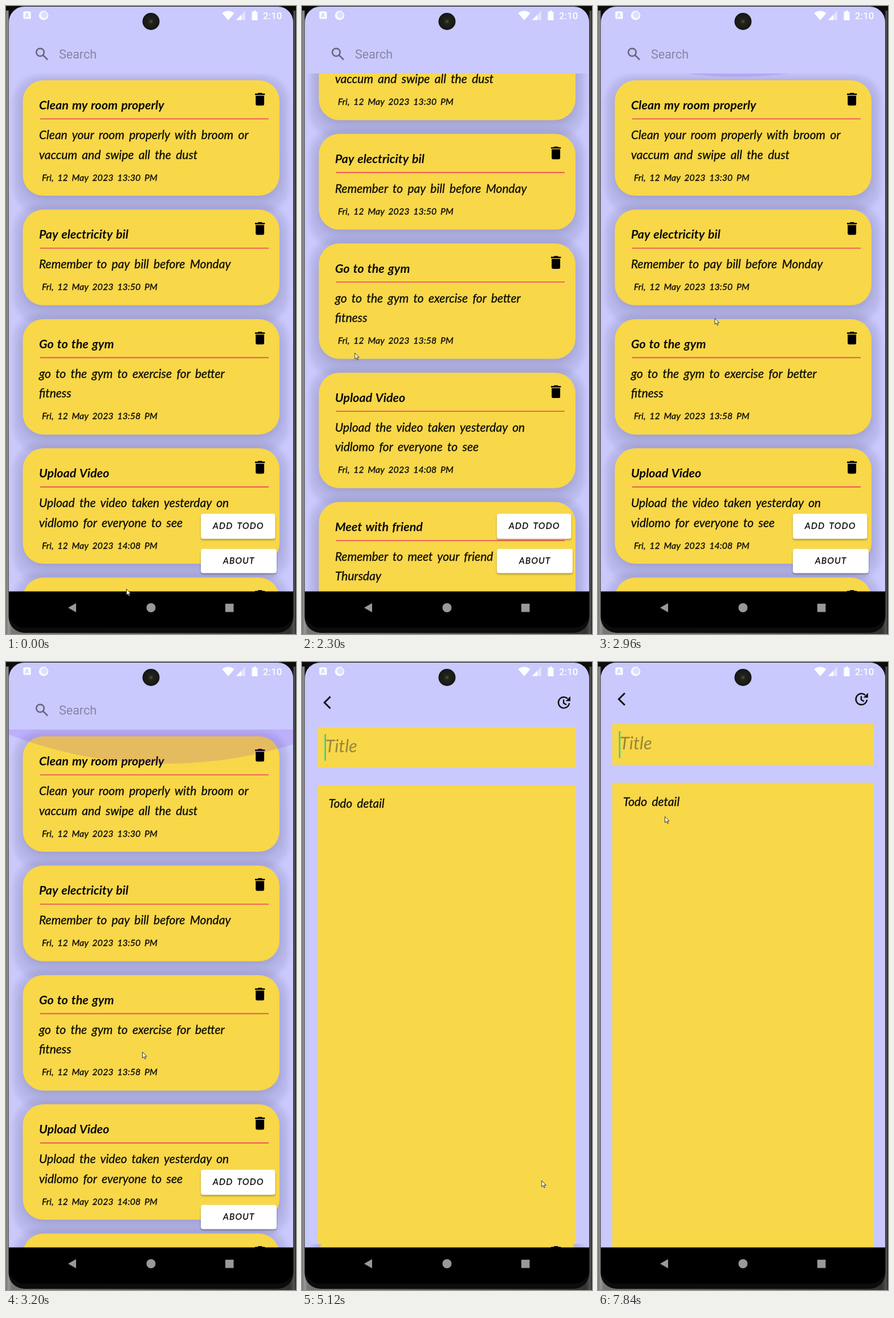
An HTML page that plays this animation: 509 px wide and 1099 px high, repeating every 8 s.

```html
<!DOCTYPE html>
<html lang="en">
<head>
<meta charset="utf-8">
<title>Todo app</title>
<style>
  html, body { margin: 0; height: 100%; overflow: hidden; background: #000; }
  svg { display: block; width: 100%; height: 100%; }
  text { font-family: Lato, "Open Sans", sans-serif; font-style: italic; fill: #0b0a05; }
  .ui { font-family: Roboto, sans-serif; font-style: normal; }
  .heading { font-size: 21.5px; font-weight: 700; word-spacing: 1.5px; }
  .body { font-size: 21px; word-spacing: 3.5px; }
  .date { font-size: 16px; word-spacing: 3px; }
  .label { font-size: 15.5px; letter-spacing: 1.2px; word-spacing: 3px; }
  .body, .date, .label { stroke: #0b0a05; stroke-width: .3px; }
  .paper { fill: #f8d749; }
  .halo { fill: #00001e; opacity: .065; filter: blur(4px); }
  .card { filter: drop-shadow(0 8px 11px rgba(0, 0, 20, .16)); }
  .button { fill: #fff; filter: drop-shadow(0 2px 1.5px rgba(0, 0, 0, .32)); }
  .button.pressed { filter: drop-shadow(0 6px 4px rgba(0, 0, 0, .36)); }
  #editor { transform-origin: 254px 512px; }
</style>
</head>
<body>
<svg viewBox="0 0 509 1099" preserveAspectRatio="none">
  <defs>
    <linearGradient id="metal">
      <stop offset="0" stop-color="#777"/>
      <stop offset=".009" stop-color="#989898"/>
      <stop offset=".02" stop-color="#777"/>
      <stop offset=".98" stop-color="#333"/>
      <stop offset=".994" stop-color="#555"/>
      <stop offset="1" stop-color="#222"/>
    </linearGradient>
    <radialGradient id="lens">
      <stop offset="0" stop-color="#5a583f"/>
      <stop offset=".25" stop-color="#24241d"/>
      <stop offset="1" stop-color="#151513"/>
    </radialGradient>
    <clipPath id="screenClip"><rect x="5" y="1" width="499" height="1087" rx="27"/></clipPath>
    <clipPath id="listClip"><rect x="5" y="118" width="499" height="907"/></clipPath>
    <path id="trash" d="M6 19c0 1.1.9 2 2 2h8c1.1 0 2-.9 2-2V7H6zM19 4h-3.5l-1-1h-5l-1 1H5v2h14z"/>
  </defs>

  <rect width="509" height="1099" fill="url(#metal)"/>
  <rect x="4.5" y="-30" width="500" height="1127" rx="28" fill="#0c0c0c"/>
  <rect width="509" height="8" fill="#0c0c0c"/>

  <g clip-path="url(#screenClip)">
    <rect x="5" y="1" width="499" height="1024" fill="#c9c9fe"/>

    <g id="home">
      <g fill="none" stroke="#65657f" stroke-width="2.5">
        <circle cx="60" cy="81" r="6.8"/>
        <path d="M65 86l8 8"/>
      </g>
      <text class="ui" x="93" y="92" style="font-size:21.5px;fill:#8686a6">Search</text>
      <g clip-path="url(#listClip)">
        <g id="cards"></g>
        <circle id="glow" r="760" fill="#6200ee" opacity=".13"/>
      </g>
      <rect id="add" class="button" x="342" y="888.5" width="130.5" height="44" rx="4"/>
      <rect class="button" x="342" y="950" width="133" height="42.5" rx="4"/>
      <text class="label" x="363" y="915">ADD TODO</text>
      <text class="label" x="381" y="976">ABOUT</text>
    </g>

    <g id="editor">
      <rect x="5" y="1" width="499" height="1024" fill="#c9c9fe"/>
      <g fill="none" stroke="#111" stroke-width="2.5">
        <path d="M47 54.5L36.5 65L47 75.5" stroke-width="3"/>
        <path d="M469 58A9.7 9.7 0 1 0 472 66M462 59.5V66L467 69"/>
        <path d="M474 54V62.5H465.500z" fill="#111" stroke="none"/>
      </g>
      <rect class="paper" x="25" y="108.5" width="459" height="71.5"/>
      <rect class="paper" x="25" y="211.5" width="459" height="814"/>
      <text x="38" y="153" style="font-size:31px;fill:#96863a">Title</text>
      <rect id="caret" x="36.7" y="121" width="2.5" height="47" fill="#1fd3a4"/>
      <text class="body" x="44" y="252">Todo detail</text>
    </g>

    <g fill="#fff">
      <rect x="30.5" y="9.5" width="13" height="13" rx="1.5"/>
      <text class="ui" x="33.3" y="20" style="font-size:10.5px;font-weight:700;fill:#c9c9fe">A</text>
      <circle cx="66" cy="16.5" r="8.3" opacity=".85"/>
      <circle cx="67" cy="15.5" r="5.5" fill="#dedefc"/>
      <path d="M379.5 12.5Q390 4.5 400.5 12.5L390 25z"/>
      <path d="M420 8.5V24.5H404z" opacity=".45"/>
      <path d="M413 15.5V24.5H404z"/>
      <path d="M431.5 10h3V8h4v2h3v15h-10z"/>
      <text class="ui" x="451" y="23" style="font-size:17px;font-weight:500;fill:#fff">2:10</text>
    </g>

    <rect x="5" y="1024.5" width="499" height="64"/>
    <g fill="#999">
      <path d="M109 1053L123 1045V1061z"/>
      <circle cx="254.5" cy="1053" r="8"/>
      <rect x="385" y="1046" width="14.5" height="14.5"/>
    </g>
  </g>
  <circle cx="254.5" cy="27" r="15" fill="url(#lens)"/>
  <path id="pointer" d="M.5 .5V11L3 8.8L4.8 12.7L6.4 12L4.7 8.2H8z" fill="#fff" stroke="#222" stroke-width=".9"/>
</svg>
<script>
const LOOP = 8000, TICK = 128;
const LIST_TOP = 118, LIST_BOTTOM = 1024.5, MAX_SCROLL = 190;
const GLOW_RADIUS = 760, GLOW_DEPTH = 61;
// Moments of the story, in ticks.
const PRESS = 17, TURN = 20, RELEASE = 25, TAP = 37, OPEN = 38, READY = 41;

const get = id => document.getElementById(id);
const clamp = (value, low = 0, high = 1) => Math.min(high, Math.max(low, value));

const todos = [
  ['Clean my room properly', '13:30', 'Clean your room properly with broom or', 'vaccum and swipe all the dust'],
  ['Pay electricity bil', '13:50', 'Remember to pay bill before Monday'],
  ['Go to the gym', '13:58', 'go to the gym to exercise for better', 'fitness'],
  ['Upload Video', '14:08', 'Upload the video taken yesterday on', 'vidlomo for everyone to see'],
  ['Meet with friend', '14:09', 'Remember to meet your friend on', 'Thursday'],
];

function buildCards() {
  let y = 130, halos = '', cards = '';
  for (const [title, time, ...lines] of todos) {
    const height = 133 + 34.5 * lines.length;
    halos += `<rect class="halo" x="13" y="${y - 9}" width="483" height="${height + 40}" rx="46"/>`;
    cards += `<g transform="translate(0 ${y})">
      <rect class="card paper" x="29.5" width="450.5" height="${height}" rx="36"/>
      <text class="heading" x="58" y="51">${title}</text>
      <path d="M60 67.5H461" stroke="#f0405a" stroke-width="1.6"/>
      ${lines.map((line, i) => `<text class="body" x="58" y="${103 + 34.5 * i}">${line}</text>`).join('')}
      <text class="date" x="63" y="${height - 26.5}">Fri, 12 May 2023 ${time} PM</text>
      <use href="#trash" transform="translate(430.8 18.3) scale(1.24)"/>
    </g>`;
    y += height + 24.2;
  }
  get('cards').innerHTML = halos + cards;
}

// Turning points of the pointer: tick, x, y.
const pointerPath = [
  [0, 211, 1020], [3, 230, 1041], [14, 232, 1043], [15, 246, 1007],
  [PRESS, 62, 739], [TURN, 153, 342], [RELEASE, 239, 682],
  [29, 464, 959], [31, 438, 888], [33, 421, 908], [42, 420, 907],
  [43, 405, 840], [45, 235, 384], [47, 211, 287], [49, 235, 205],
  [52, 228, 204], [54, 117, 270],
];

function pointerAt(tick) {
  const next = pointerPath.findIndex(point => point[0] > tick);
  if (next < 0) return pointerPath.at(-1).slice(1);
  const [t0, x0, y0] = pointerPath[next - 1], [t1, x1, y1] = pointerPath[next];
  const part = (tick - t0) / (t1 - t0);
  return [x0 + (x1 - x0) * part, y0 + (y1 - y0) * part];
}

// The list follows the finger; what it pulls past an end becomes the edge glow.
function drawList(tick) {
  const [x, y] = pointerAt(clamp(tick, PRESS, RELEASE));
  const pull = tick <= TURN
    ? pointerAt(PRESS)[1] - y
    : MAX_SCROLL + pointerAt(TURN)[1] - y;
  const scroll = clamp(pull, 0, MAX_SCROLL);
  get('cards').setAttribute('transform', `translate(0 ${-scroll})`);

  const fade = clamp(1 - (tick - RELEASE) / 4);
  const depth = Math.min(GLOW_DEPTH, Math.abs(pull - scroll) * .4) * fade;
  const reach = GLOW_RADIUS - depth;
  const glow = get('glow');
  glow.setAttribute('cx', x + 40);
  glow.setAttribute('cy', pull > 0 ? LIST_BOTTOM + reach : LIST_TOP - reach);
  glow.style.display = depth ? '' : 'none';
}

function drawEditor(tick, time) {
  const progress = clamp((tick - OPEN) / (READY - OPEN));
  const editor = get('editor');
  editor.style.opacity = clamp(progress * 1.6);
  editor.style.transform = progress < 1 ? `scale(${.96 + .04 * progress})` : 'none';
  get('home').style.display = progress < 1 ? '' : 'none';
  get('caret').style.opacity = Math.floor((time - 4900) / 490) % 2 ? 0 : 1;
}

function draw(time) {
  const tick = Math.floor((time + 20) / TICK);
  get('pointer').setAttribute('transform', `translate(${pointerAt(tick)})`);
  get('add').classList.toggle('pressed', tick >= TAP);
  drawList(tick);
  drawEditor(tick, time);
}

buildCards();
const start = performance.now();
function frame() {
  draw((performance.now() - start) % LOOP);
  requestAnimationFrame(frame);
}
frame();
</script>
</body>
</html>
```
